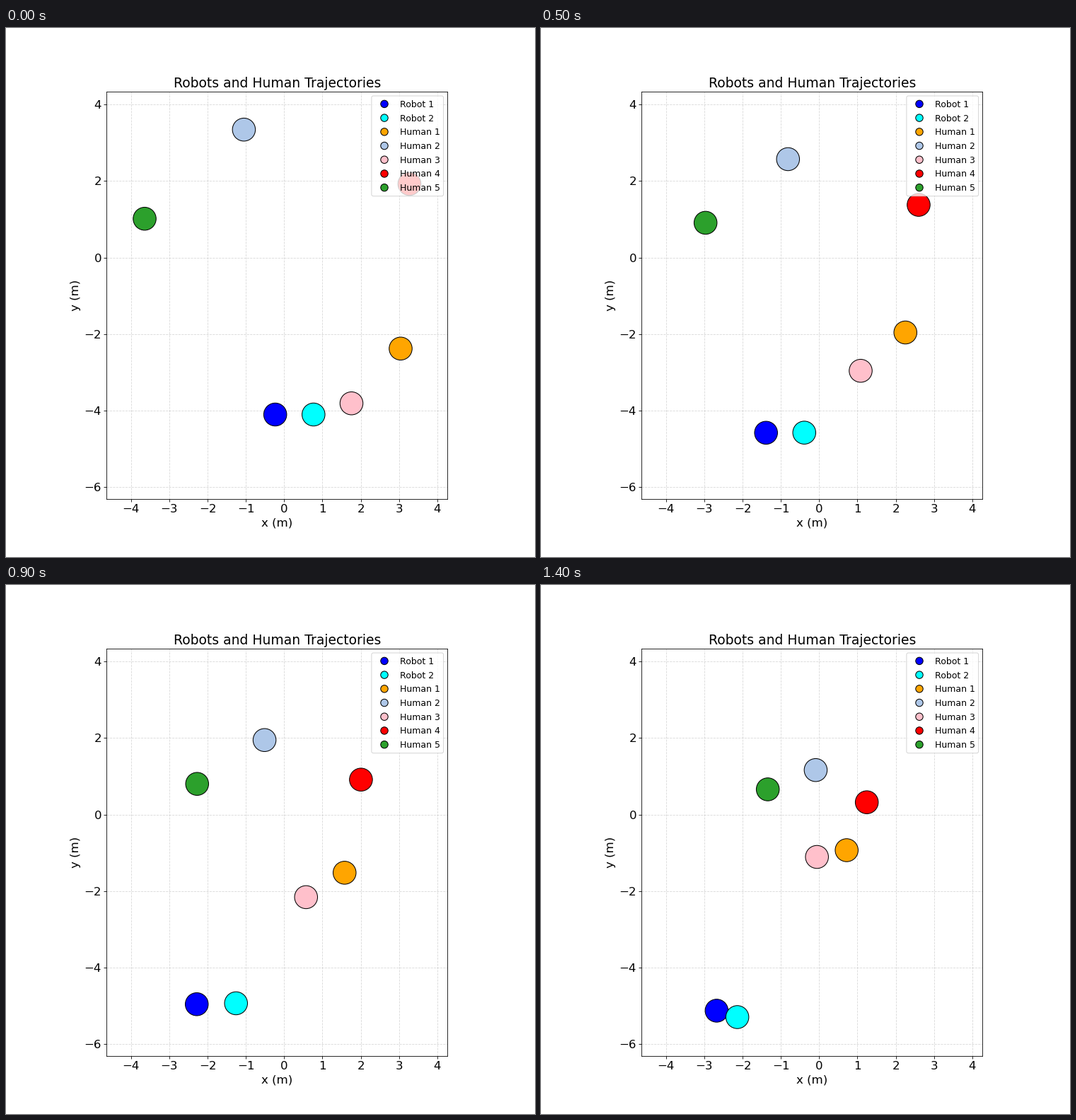
Recreate the animation shown at these times as a matplotlib script. Size 748 by 748 pixels, loop 1.5 s.

```python
import numpy as np
import matplotlib.pyplot as plt
from matplotlib.animation import FuncAnimation
from matplotlib.patches import Circle, FancyBboxPatch
from matplotlib.transforms import Affine2D

SIZE, DPI = 748, 74.8
FRAMES, INTERVAL = 15, 100
RADIUS = 0.3
TURN, LAST = 6, FRAMES - 1
ARRIVE = 10               # when Robot 1 reaches its goal
HEADING = (1, 0.41)       # direction in which the robots travel

plt.rcParams.update({
    "font.family": "DejaVu Sans",
    "xtick.labelsize": 16,
    "ytick.labelsize": 16,
})


def walk(start, turn, end):
    """Two straight legs at constant speed."""
    times, (xs, ys) = (0, TURN, LAST), zip(start, turn, end)
    return lambda t: (np.interp(t, times, xs), np.interp(t, times, ys))


def lead(t):
    """Drive, slow down, then overshoot the goal and ring out."""
    times = (0, TURN, 8, ARRIVE)
    swing = -0.235 * (-0.72) ** (t - ARRIVE) if t >= ARRIVE else 0
    x = np.interp(t, times, (-0.234, -1.619, -1.952, -2.615))
    y = np.interp(t, times, (-4.098, -4.670, -4.809, -5.095))
    return x + swing * HEADING[0], y + swing * HEADING[1]


def follow(t):
    """Drive straight, a little slower at the end."""
    way = 0.231 * min(t, 8) + 0.176 * max(t - 8, 0)
    return 0.766 - way * HEADING[0], -4.098 - way * HEADING[1]


AGENTS = [
    ("Robot 1", "blue", lead),
    ("Robot 2", "cyan", follow),
    ("Human 1", "orange",
     walk((3.042, -2.376), (2.094, -1.871), (0.718, -0.929))),
    ("Human 2", "#aec7e8",
     walk((-1.052, 3.344), (-0.766, 2.418), (-0.091, 1.164))),
    ("Human 3", "pink",
     walk((1.758, -3.806), (0.949, -2.786), (-0.058, -1.105))),
    ("Human 4", "red",
     walk((3.272, 1.925), (2.463, 1.269), (1.244, 0.323))),
    ("Human 5", "#2ca02c",
     walk((-3.645, 1.016), (-2.833, 0.889), (-1.342, 0.660))),
]


def draw_legend(fig):
    # Pixel coordinates with the origin at the top left
    pixels = Affine2D().scale(1, -1).translate(0, SIZE)
    left, top, right, bottom = 516.9, 96, 618.6, 237.7
    fig.add_artist(FancyBboxPatch(
        (left, top), right - left, bottom - top,
        boxstyle="round,pad=0,rounding_size=2.5", fc="white", ec="0.8",
        lw=1, alpha=0.8, transform=pixels, zorder=5))
    for row, (name, color, _) in enumerate(AGENTS):
        y = 107.4 + 19.71 * row
        fig.add_artist(Circle((535, y), 5.2, fc=color, ec="black", lw=1,
                              transform=pixels, zorder=6))
        fig.text(556.8, y + 4.5, name, size=12, va="baseline",
                 transform=pixels, zorder=6)


fig, ax = plt.subplots(figsize=(SIZE / DPI, SIZE / DPI), dpi=DPI)
ax.set_aspect("equal")
ax.set_xlim(-4.637, 4.268)
ax.set_ylim(-6.30, 4.34)
ax.set_xticks(range(-4, 5))
ax.set_yticks(range(-6, 5, 2))
ax.grid(True, ls="--", alpha=0.5)
ax.set_title("Robots and Human Trajectories", size=18)
ax.set_xlabel("x (m)", size=16)
ax.set_ylabel("y (m)", size=16)
draw_legend(fig)

circles = [ax.add_patch(Circle(path(0), RADIUS, fc=color, ec="black", lw=1,
                               zorder=3))
           for _, color, path in AGENTS]


def update(frame):
    for circle, (_, _, path) in zip(circles, AGENTS):
        circle.center = path(frame)
    return circles


anim = FuncAnimation(fig, update, frames=FRAMES, interval=INTERVAL,
                     init_func=lambda: update(0), repeat=True)
plt.show()
```
